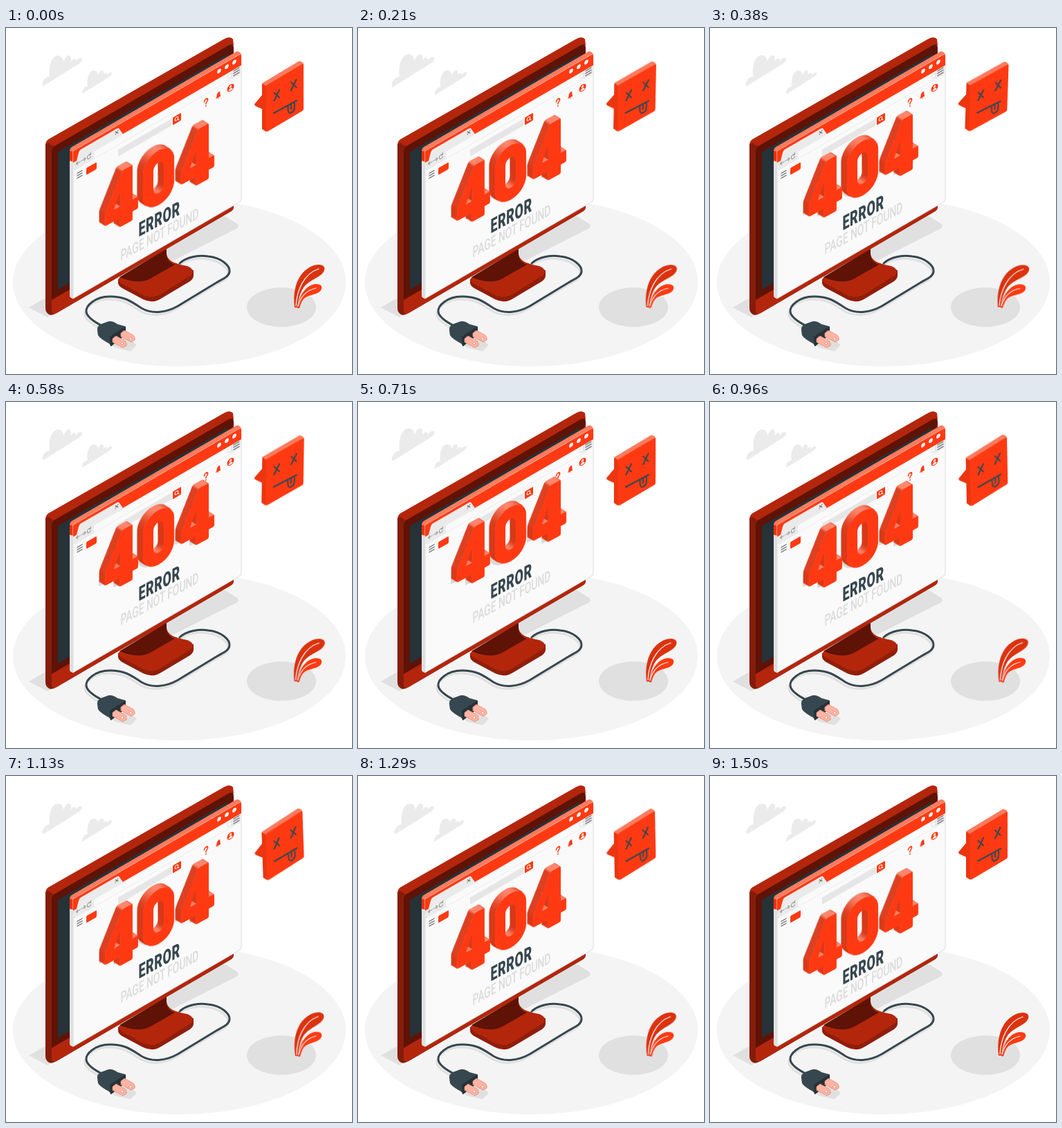
These frames come from a looping animation (500x500 px, 1.54 s). An HTML page:

```html
<!DOCTYPE html>
<html lang="en">
<head>
<meta charset="utf-8">
<title>404</title>
<style>
  html, body { margin: 0; width: 100%; height: 100%; overflow: hidden; background: #fff; }
  svg { display: block; width: 100%; height: 100%; }
  .anim { animation: 1540ms linear infinite; }
  .clouds { animation-name: beat; transform-origin: 102px 67px; }
  .face { animation-name: wind; transform-origin: 397px 99px; }
  .leaves { animation-name: wind; transform-origin: 438px 374px; }
  .rise { animation-name: rise; }
  .digits { --lift: -27px; }
  .copy { --lift: -18px; }

  /* each cycle runs 1500 ms, then rests for 40 ms */
  @keyframes beat {
    0%, 29.2%, 39%, 58.4%, 100% { transform: scale(1); }
    9.74% { transform: scale(1.1); }
    48.7% { transform: scale(1.1); animation-timing-function: ease; }
  }
  @keyframes wind {
    0%, 97.4%, 100% { transform: rotate(0); }
    24.35% { transform: rotate(2deg); }
    73.05% { transform: rotate(-2deg); }
  }
  @keyframes rise {
    0%, 97.4%, 100% { transform: translateY(0); }
    48.7% { transform: translateY(var(--lift)); }
  }
  text { font-family: Roboto, sans-serif; }
  .line { fill: none; stroke-linecap: round; stroke-linejoin: round; }
</style>
</head>
<body>
<svg viewBox="0 0 500 500">
  <defs>
    <path id="cloud" d="M53 84C51 79 56 71 63 70C61 56 66 40 75 40C81 40 83 45 83 49C86 41 90 38 93 41Q95 44 93 49C97 44 100 43 101 48C104 44 109 42 110 45C110 48 108 50 105 52L57 82Q54 84 53 84Z"/>
    <path id="cable" d="M251 340C262 330 280 328 292 330C312 332 324 344 323 352C322 360 312 363 304 368L248 402C232 411 212 414 196 405C183 397 174 388 150 388C128 388 115 402 116 410C117 418 128 425 140 431"/>
  </defs>

  <ellipse cx="250.5" cy="367.500" rx="240.5" ry="121.500" fill="#f4f4f4"/>
  <path d="M33 404L57 390L300 264L318 273L334 283Q338 287 333 290L240 337L180 348L66 414L60 418Z" fill="#e0e0e0"/>
  <ellipse cx="398" cy="403.5" rx="50" ry="28.5" fill="#e0e0e0"/>

  <g class="anim clouds" fill="#ebebeb">
    <use href="#cloud"/>
    <use href="#cloud" transform="translate(70.6 31.4) scale(.75)"/>
  </g>

  <!-- cable and plug -->
  <g class="line" stroke-width="3">
    <use href="#cable" stroke="#e0e0e0" x="-2" y="4"/>
    <use href="#cable" stroke="#37474f"/>
  </g>
  <path d="M134 446L158 462L180 467L189 458L180 450Z" fill="#e0e0e0"/>
  <path d="M132 437Q131 431 137 428L148 424Q154 423 161 428L172 431V444L152 460L149 456Q136 449 133 444Z" fill="#37474f"/>
  <path d="M150 446L173 431V443L151 460Z" fill="#263238"/>
  <g fill="#ffb4a3" stroke="#e98b78" stroke-width=".8">
    <path d="M166 441L171 437L184 444Q187 447 186 451L181 454L166 446Z"/>
    <path d="M154 449L159 445L172 452Q175 455 174 459L169 462L154 454Z"/>
    <circle cx="180" cy="449" r="1.8" fill="#fff"/>
    <circle cx="168" cy="456" r="1.8" fill="#fff"/>
  </g>

  <!-- stand -->
  <path d="M162 363V369Q163 373 168 376L198 392Q212 399 224 391L266 366Q271 362 271 358V350Z" fill="#8f1e0a"/>
  <path d="M165 360L180 351L232 319V326C233 335 240 340 262 344Q276 350 266 358L223 385Q211 392 198 386L167 369Q159 364 165 360Z" fill="#b3260c"/>
  <path d="M164 360L232 319V328Q233 338 244 342L207 363Q190 371 164 360Z" fill="#5e1306"/>

  <!-- monitor -->
  <path d="M57 170Q57 164 61 161L315 16Q323 11 328 16L329 25L66 176Z" fill="#b3260c"/>
  <path d="M57 168V405Q57 411 62 414Q66 416 71 413V172L61 166Z" fill="#851c09"/>
  <path d="M66 179Q66 173 71 170L320 26Q329 21 329 29V258Q329 263 325 265L73 412Q66 415 66 409Z" fill="#5e1306"/>
  <path d="M66 393L329 241V258Q329 263 325 265L73 412Q66 415 66 409Z" fill="#b3260c"/>
  <path d="M75 179L321 37V236L75 378Z" fill="#263238"/>

  <!-- browser window -->
  <path d="M92 177V387Q92 390 97 391V178Z" fill="#e0e0e0"/>
  <path d="M92 177V192L97 193V178Z" fill="#e6340f"/>
  <path d="M92 177Q92 174 95 172L333 34Q336 33 340 37L97 179Z" fill="#ff7a5c"/>
  <g transform="matrix(1 -.58 0 1 97 178)">
    <path d="M0 0H243V210Q243 213 240 213H0Z" fill="#fafafa" stroke="#dedede"/>
    <path d="M0 0H241Q243 0 243 3V17H0Z" fill="#ff3a12"/>
    <path d="M0 17H5L8 7Q9 4 11 4H63Q66 4 67 7L72 17H243V29H0Z" fill="#ebebeb"/>
    <rect x="30" y="18" width="198" height="10" rx="2" fill="#fafafa"/>
    <circle cx="226" cy="22.5" r="3" fill="none" stroke="#e0e0e0"/>
    <g fill="#fff">
      <circle cx="211" cy="6.6" r="2.9"/><circle cx="222" cy="6.6" r="2.9"/><circle cx="233" cy="6.4" r="2.9"/>
    </g>
    <g class="line" stroke="#777" stroke-width="1.1">
      <path d="M61 7.5l4 4m0-4l-4 4"/>
      <path stroke="#999" d="M10 21H4.500m2-2l-2 2 2 2M12 21h6m-2-2l2 2-2 2M25 19a2.700 3 0 1 0 .5 3.500M25.500 17v2.500h-2"/>
    </g>
    <path class="line" stroke="#757575" stroke-width="1.5" d="M232 18.500h8M232 22h8M232 25.500h8M6 35.500h7M6 39h7M6 42.500h7"/>
    <rect x="19" y="35.5" width="15" height="10" rx="1.500" fill="#ff3a12"/>
    <rect x="65" y="35.500" width="78" height="10" fill="#e6e6e6"/>
    <rect x="144" y="35" width="12" height="11" rx="1" fill="#ff3a12"/>
    <g class="line" stroke="#fff"><circle cx="149.500" cy="39.800" r="2.300"/><path d="M151.300 41.600l1.700 1.900"/></g>
    <path class="line" stroke="#ff3a12" stroke-width="1.900" d="M189.700 38.500a2.400 2.600 0 1 1 4 1.900q-1.700 1-1.700 2.600M192 46v.1"/>
    <path fill="#ff3a12" d="M206 44q1.500-1.500 1.500-4t2.500-3.500 2.500 3.500 1.500 4ZM208.800 45h2.400q-1.200 2-2.400 0Z"/>
    <circle cx="227.500" cy="40.400" r="5" fill="#ff3a12"/>
    <g fill="#fff"><circle cx="227.500" cy="38.600" r="1.700"/><path d="M224.300 43q3.200-4 6.400 0-3.200 2.500-6.400 0Z"/></g>
  </g>

  <g class="anim rise copy">
    <g id="shade" transform="matrix(1 -.545 0 1 134 271.700)" fill="#dadada" fill-rule="evenodd"/>
    <text transform="matrix(.63 -.343 0 1 191.500 302)" font-size="28.500" font-weight="900" letter-spacing=".8" fill="#37474f">ERROR</text>
    <text transform="matrix(.63 -.347 0 1 165.500 337)" font-size="22" font-weight="500" fill="#dbdbdb">PAGE NOT FOUND</text>
  </g>
  <g class="anim rise digits">
    <g id="digits" transform="matrix(1 -.545 0 1 143 277.700)"/>
  </g>

  <!-- speech bubble -->
  <g class="anim face">
    <path d="M370 80V97L359 110Q359 112 361 113L370 117V146L376 150V83Z" fill="#eb3610"/>
    <path d="M370 80L423 48Q425 47 430 51L376 84Z" fill="#ff7a5c"/>
    <path d="M376 83L428 52Q430 51 430 53V117Q430 119 428 120L379 149Q376 151 376 148Z" fill="#ff3a12"/>
    <g class="line" stroke="#37474f" stroke-width="2">
      <path d="M387.500 93.500L395 100.500M395 89.500L387.500 105M412 78.500L419.500 85.500M419.500 74.500L412 90"/>
      <path d="M387 123L420 105M407.500 112V118Q408 124 412 122.500Q417 120 417 115V106.500M412 110V117"/>
    </g>
  </g>

  <g class="anim leaves">
    <path fill="#dc320f" d="M417 404C414 380 420 352 445 343C456 340 462 344 460 350C456 361 440 362 430 375C424 384 422 395 421 404Z"/>
    <path fill="#ff3a12" d="M421 405C424 385 434 371 448 370C456 370 458 374 455 379C449 387 436 384 429 393C426 397 425 402 424 405Z"/>
    <path class="line" stroke="#fff" stroke-width="1.200" d="M419 402C420 380 430 355 452 348M422 402C426 387 434 379 448 376"/>
  </g>
</svg>

<script>
  const NS = 'http://www.w3.org/2000/svg';
  const digits = document.getElementById('digits');
  const shade = document.getElementById('shade');
  const BACK = [-8, -9.4];
  const DARK = [218, 49, 15], LIGHT = [255, 128, 102];

  const add = (parent, attrs) => {
    const el = document.createElementNS(NS, 'path');
    for (const k in attrs) el.setAttribute(k, attrs[k]);
    return parent.appendChild(el);
  };

  // outer outlines run clockwise, holes the other way
  const four = x => [
    `M${x + 24} -56Q${x + 25} -58 ${x + 27} -58h11q2 0 2 2v48h6q2 0 2 2v13q0 2-2 2h-6v11q0 2-2 2h-15q-2 0-2-2v-11h-19q-2 0-2-2v-13q0-2 .8-4Z`,
    `M${x + 22} -30l-9 22h9Z`
  ];
  const zero = x => [
    `M${x} -36a22.500 22.500 0 0 1 45 0v34a22.500 22.500 0 0 1-45 0Z`,
    `M${x + 15} -33v28a7.500 8 0 0 0 15 0v-28a7.500 8 0 0 0-15 0Z`
  ];

  function sides(parent, d) {
    const probe = add(parent, { d, fill: 'none' });
    const len = probe.getTotalLength(), n = Math.ceil(len);
    const pts = Array.from({ length: n + 1 }, (_, i) => probe.getPointAtLength(len * i / n));
    probe.remove();
    for (let i = 0; i < n; i++) {
      const a = pts[i], b = pts[i + 1];
      const tx = b.x - a.x, ty = b.y - a.y, l = Math.hypot(tx, ty) || 1;
      const nx = ty / l, ny = -tx / l;
      if (nx * BACK[0] + ny * BACK[1] <= 0) continue;
      const up = Math.max(0, -ny) ** 3;
      const color = `rgb(${DARK.map((c, k) => Math.round(c + (LIGHT[k] - c) * up))})`;
      add(parent, {
        d: `M${a.x} ${a.y}L${b.x} ${b.y}l${BACK}L${a.x + BACK[0]} ${a.y + BACK[1]}Z`,
        fill: color, stroke: color, 'stroke-width': .5
      });
    }
  }

  for (const glyph of [four(110), zero(55), four(0)]) {
    const d = glyph.join('');
    add(shade, { d });
    glyph.slice().reverse().forEach(part => sides(digits, part));
    add(digits, { d, fill: '#ff3a12', 'fill-rule': 'evenodd' });
  }
</script>
</body>
</html>
```
